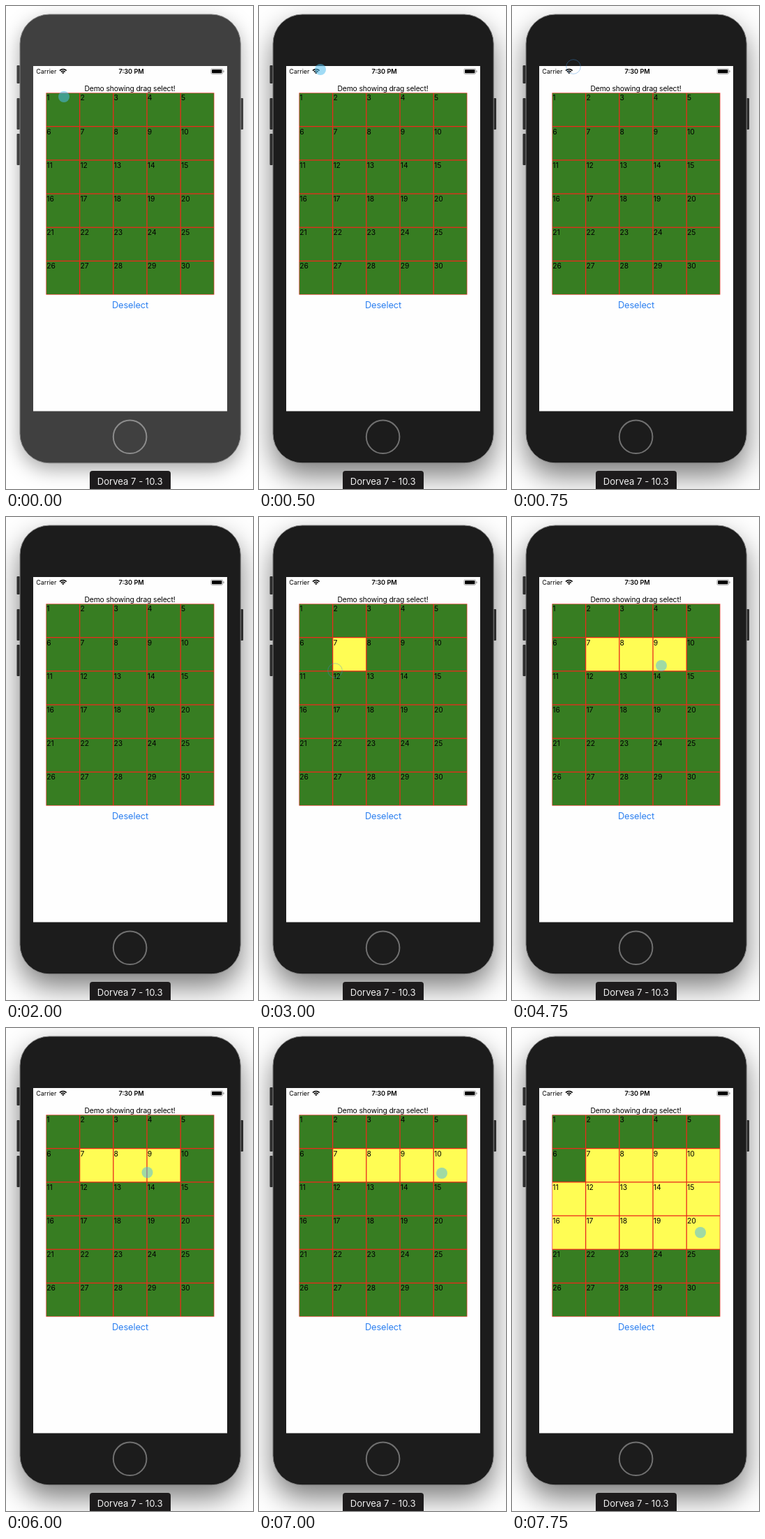
Animation of 354 by 692 pixels, one loop 8000 ms. Source, as an HTML page:

```html
<!DOCTYPE html>
<html lang="en">
<head>
<meta charset="utf-8">
<title>Drag select</title>
<style>
  html, body { margin: 0; width: 100%; height: 100%; overflow: hidden; background: #fff; }
  #stage { position: relative; width: 354px; height: 692px; overflow: hidden; font-family: Inter, Roboto, sans-serif; }
  #shadow {
    position: absolute; left: 20px; top: 12px; width: 316px; height: 643px;
    border-radius: 42px; box-shadow: 0 18px 40px rgba(0, 0, 0, .52);
  }
  .idle #shadow { box-shadow: 0 9px 28px rgba(0, 0, 0, .34); }
  svg { position: absolute; left: 0; top: 0; }
  .body { fill: #1c1c1c; stroke: #808080; }
  .idle .body { fill: #404040; }
  .key { fill: #2d2d2d; }
  .idle .key { fill: #404040; }
  .home { fill: none; stroke: #707070; stroke-width: 2; }
  .idle .home { stroke: #8c8c8c; }
  .cell { fill: #377d22; }
  .cell.on { fill: #fffd54; }
  .num { font-size: 10.3px; }
  .mid { text-anchor: middle; }
</style>
</head>
<body>
<div id="stage" class="idle">
  <div id="shadow"></div>
  <svg width="354" height="692" viewBox="0 0 354 692">
    <g class="key">
      <rect x="15.5" y="85" width="4.5" height="26" rx="1"/>
      <rect x="15.5" y="132" width="4.5" height="45" rx="1"/>
      <rect x="15.5" y="183" width="4.5" height="45" rx="1"/>
      <rect x="335.5" y="132" width="4.5" height="45" rx="1"/>
    </g>
    <rect class="body" x="20" y="12" width="316.2" height="642.8" rx="42"/>
    <rect x="39" y="86" width="278" height="494.5" fill="#fefefe"/>
    <circle class="home" cx="177.6" cy="617.3" r="23.8"/>

    <text x="43.3" y="97" font-size="8.9">Carrier</text>
    <g fill="none" stroke="#000" stroke-width="1.6">
      <path d="M77 92.6a6.7 6.7 0 0 1 9.6 0M78.9 94.5a4.1 4.1 0 0 1 5.8 0"/>
      <path d="M81.8 97.2l-1.6-1.7a2.3 2.3 0 0 1 3.2 0z" fill="#000" stroke="none"/>
    </g>
    <text class="mid" x="179.6" y="97" font-size="9.1" font-weight="600">7:30 PM</text>
    <rect x="293.8" y="89.8" width="16.8" height="7.6" rx="1.8" fill="none" stroke="#888" stroke-width=".7"/>
    <rect x="295" y="91" width="14.4" height="5.2" rx=".9"/>
    <rect x="311.4" y="92.2" width="1.1" height="2.8" rx=".5" fill="#888"/>

    <text class="mid" x="177.5" y="122.3" font-size="10.3" letter-spacing="-.1">Demo showing drag select!</text>
    <g id="grid"></g>
    <text class="mid" x="178" y="432.6" font-size="12.8" letter-spacing="-.12" fill="#2b7ff0">Deselect</text>

    <rect x="120" y="666" width="116" height="32" rx="4" fill="#1d1b1c"/>
    <text class="mid" x="177.7" y="685.6" font-size="13.1" fill="#f0f0f0">Dorvea 7 - 10.3</text>
    <circle id="touch"/>
  </svg>
</div>
<script>
const STEP = 250, LOOP = 8000;
const COLS = 5, ROWS = 6, LEFT = 57.4, TOP = 124.4, SIZE = 48.2, BORDER = .65;
const FIRST = 6, DRAG_START = 11;
const NONE = 0, PRESS = 1, RING = 2;

// step, x, y, touch look
const keys = [
  [0, 83, 130, PRESS], [2, 88, 91, PRESS], [3, 88, 87, RING], [4, 88, 87, NONE],
  [11, 110, 216, PRESS], [12, 109, 220, RING], [13, 112, 213, PRESS],
  [19, 214, 213, PRESS], [24, 202.5, 207, PRESS], [28, 262, 208, PRESS],
  [30, 269.5, 276, PRESS], [31, 270, 293, PRESS]
];

const stage = document.getElementById('stage');
const grid = document.getElementById('grid');
const touch = document.getElementById('touch');

function add(name, attrs) {
  const el = document.createElementNS('http://www.w3.org/2000/svg', name);
  for (const k in attrs) el.setAttribute(k, attrs[k]);
  return grid.appendChild(el);
}

// Red backing shows between the cells as grid lines.
add('rect', { x: LEFT, y: TOP, width: COLS * SIZE, height: ROWS * SIZE, fill: '#ea2a1c' });
const cells = Array.from({ length: COLS * ROWS }, (_, i) => {
  const x = LEFT + i % COLS * SIZE, y = TOP + Math.floor(i / COLS) * SIZE;
  const side = SIZE - 2 * BORDER;
  const cell = add('rect', { class: 'cell', x: x + BORDER, y: y + BORDER, width: side, height: side });
  add('text', { class: 'num', x: x + .8, y: y + 11 }).textContent = i + 1;
  return cell;
});

function touchAt(step) {
  let i = keys.length - 1;
  while (keys[i][0] > step) i--;
  const a = keys[i], b = keys[i + 1] || a;
  const p = b === a ? 0 : (step - a[0]) / (b[0] - a[0]);
  return { x: a[1] + (b[1] - a[1]) * p, y: a[2] + (b[2] - a[2]) * p, look: a[3] };
}

function draw(step) {
  const { x, y, look } = touchAt(step);
  const ring = look === RING;
  const style = {
    cx: x, cy: y, r: ring ? 10.3 : 8,
    fill: ring ? 'none' : 'rgba(76,187,237,.53)',
    stroke: ring ? 'rgba(60,140,215,.4)' : 'none',
    visibility: look === NONE ? 'hidden' : 'visible'
  };
  for (const k in style) touch.setAttribute(k, style[k]);

  const col = Math.floor((x - LEFT) / SIZE), row = Math.floor((y - TOP) / SIZE);
  const last = step < DRAG_START ? -1 : row * COLS + col;
  cells.forEach((c, i) => c.classList.toggle('on', i >= FIRST && i <= last));
  stage.classList.toggle('idle', step < 1);
}

let shown = -1;
const start = performance.now();
function tick() {
  const step = Math.floor((performance.now() - start) % LOOP / STEP);
  if (step !== shown) draw(shown = step);
  requestAnimationFrame(tick);
}
tick();
</script>
</body>
</html>
```
